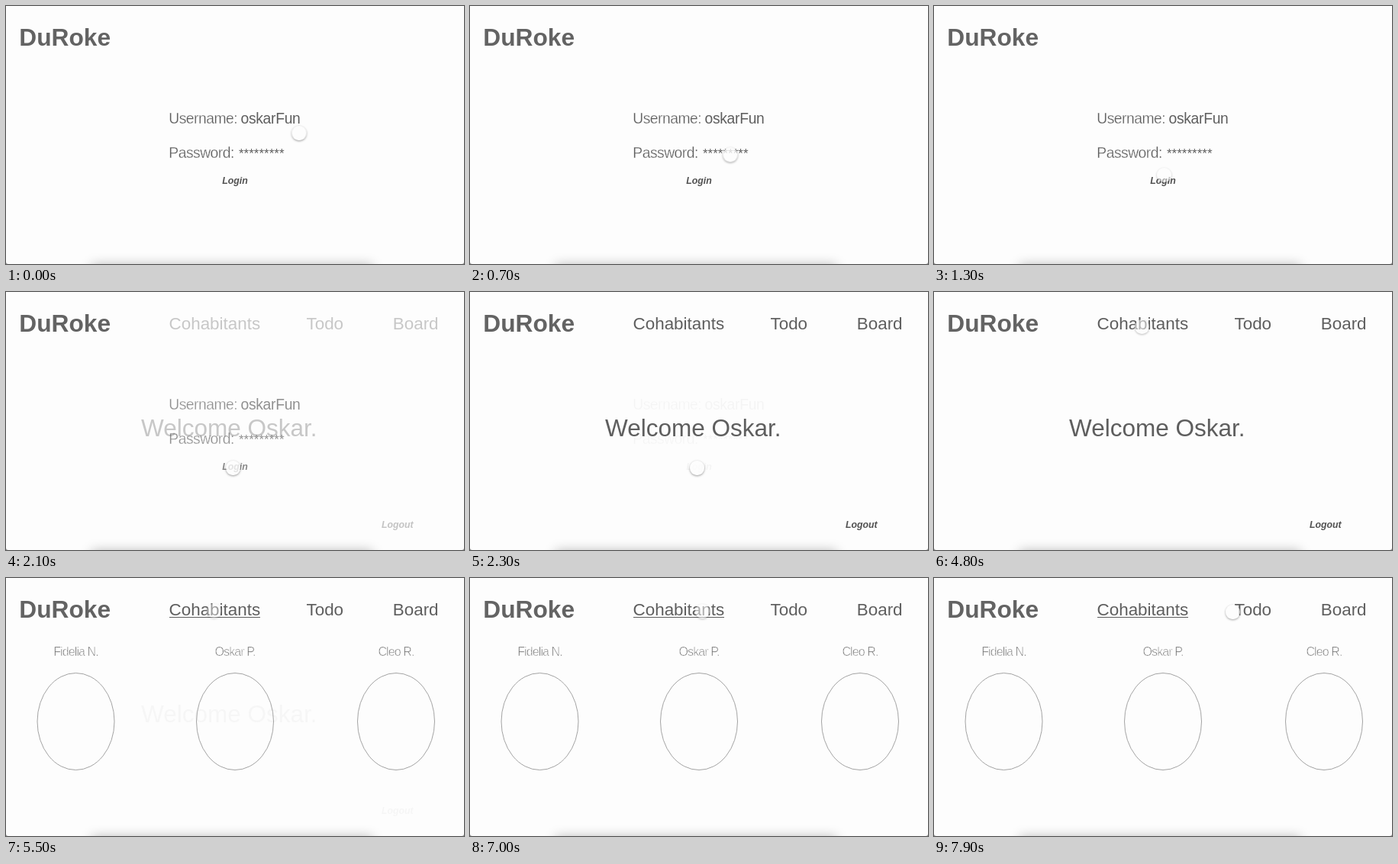
Write an HTML page that moves like this. It is 600x338 px and loops after 8000 ms.

```html
<!DOCTYPE html>
<html lang="en">
<head>
<meta charset="utf-8">
<title>Flat share prototype</title>
<style>
  html, body { margin: 0; width: 100%; height: 100%; overflow: hidden; background: #8c8c8c; }
  .stage {
    position: absolute; left: 0; top: 0; width: 600px; height: 338px;
    overflow: hidden; background: #fdfdfd; border-radius: 0 0 3px 3px;
  }
  svg { position: absolute; left: 0; top: 0; }
  text { font-family: "Liberation Sans", Arial, sans-serif; fill: #5e5e5e; white-space: pre; }

  .brand { font-size: 31.7px; font-weight: bold; fill: #636363; }
  .nav { font-size: 22.4px; }
  .label { font-size: 19.3px; letter-spacing: -.5px; stroke: #fdfdfd; stroke-width: .3px; }
  .value { font-size: 19.3px; letter-spacing: -.3px; }
  .stars { font-size: 17px; }
  .link { font-size: 12.3px; font-weight: bold; font-style: italic; fill: #515151; }
  .welcome { font-size: 31.5px; }
  .person {
    font-size: 16px; letter-spacing: -.9px; text-anchor: middle;
    fill: #6a6a6a; stroke: #fdfdfd; stroke-width: .65px;
  }
  ellipse { fill: none; stroke: #999; stroke-width: .9px; }
  .underline { stroke: #5c5c5c; stroke-width: 1.2px; }

  .dock {
    position: absolute; left: 112px; top: 339px; width: 368px; height: 24px;
    box-shadow: 0 0 15px rgba(0, 0, 0, .28);
  }
  .cursor {
    position: absolute; left: -9.5px; top: -9.5px; width: 19px; height: 19px;
    border-radius: 50%; background: rgba(253, 253, 253, .78);
    box-shadow: 0 1px 3px rgba(0, 0, 0, .42);
  }

  /* 1.25% is one 100 ms tick; motion advances once per tick */
  .login, .menu, .home, .people, .cursor { animation: 8s step-end -5ms infinite; }
  .login { animation-name: login; }
  .menu { animation-name: menu; }
  .home { animation-name: home; }
  .people { animation-name: people; }
  .cursor { animation-name: cursor; }

  @keyframes login {
    0% { opacity: 1; }
    25% { opacity: 1; animation-timing-function: steps(3); }
    28.75%, 35% { opacity: .05; }
    36.25%, 100% { opacity: 0; }
  }
  @keyframes menu {
    0% { opacity: 0; }
    25% { opacity: 0; animation-timing-function: steps(3); }
    28.75%, 100% { opacity: 1; }
  }
  @keyframes home {
    0% { opacity: 0; }
    25% { opacity: 0; animation-timing-function: steps(3); }
    28.75% { opacity: 1; }
    63.75% { opacity: 1; animation-timing-function: steps(4); }
    68.75%, 85% { opacity: .04; }
    86.25%, 100% { opacity: 0; }
  }
  @keyframes people {
    0% { opacity: 0; }
    63.75% { opacity: 0; animation-timing-function: steps(4); }
    68.75%, 100% { opacity: 1; }
  }
  @keyframes cursor {
    0% { transform: translate(383.5px, 166px); opacity: 1; }
    2.5% { transform: translate(383.5px, 166px); opacity: 1; animation-timing-function: steps(9); }
    13.75% { transform: translate(306px, 217px); opacity: 1; animation-timing-function: steps(2); }
    16.25% { transform: translate(301px, 221px); opacity: .65; animation-timing-function: steps(7); }
    25% { transform: translate(297px, 230px); opacity: 1; }
    35% { transform: translate(297px, 230px); opacity: 1; animation-timing-function: steps(7); }
    43.75% { transform: translate(273px, 131px); opacity: 1; }
    47.5% { transform: translate(273px, 131px); opacity: 1; animation-timing-function: steps(9); }
    58.75% { transform: translate(272px, 46px); opacity: .8; animation-timing-function: steps(3); }
    62.5% { transform: translate(272px, 42.5px); opacity: .5; }
    85% { transform: translate(272px, 42.5px); opacity: .5; animation-timing-function: steps(5); }
    91.25% { transform: translate(352px, 44px); opacity: .9; }
    95% { transform: translate(352px, 44px); opacity: .9; animation-timing-function: steps(3); }
    98.75%, 100% { transform: translate(391px, 44px); opacity: .9; }
  }
</style>
</head>
<body>
<div class="stage">
  <svg width="600" height="338" viewBox="0 0 600 338">
    <text class="brand" x="17.3" y="52">DuRoke</text>

    <g class="login">
      <text class="label" x="213.3" y="153.5">Username:</text>
      <text class="value" x="307.5" y="153.5">oskarFun</text>
      <text class="label" x="213.3" y="199">Password:</text>
      <text class="stars" x="305" y="199">*********</text>
      <text class="link" x="283.2" y="233">Login</text>
    </g>

    <g class="menu">
      <text class="nav" x="213.6" y="49">Cohabitants</text>
      <text class="nav" x="393.5" y="49">Todo</text>
      <text class="nav" x="506.8" y="49">Board</text>
    </g>

    <g class="home">
      <text class="welcome" x="177" y="189.3">Welcome Oskar.</text>
      <text class="link" x="491.9" y="309">Logout</text>
    </g>

    <g class="people">
      <line class="underline" x1="214" y1="51.5" x2="333" y2="51.5"/>
      <text class="person" x="91.5" y="101.5">Fidelia N.</text>
      <text class="person" x="300" y="101.5">Oskar P.</text>
      <text class="person" x="511" y="101.5">Cleo R.</text>
      <ellipse cx="91.5" cy="188" rx="50.5" ry="63.5"/>
      <ellipse cx="300" cy="188" rx="50.5" ry="63.5"/>
      <ellipse cx="511" cy="188" rx="50.5" ry="63.5"/>
    </g>
  </svg>
  <div class="dock"></div>
  <div class="cursor"></div>
</div>
</body>
</html>
```
